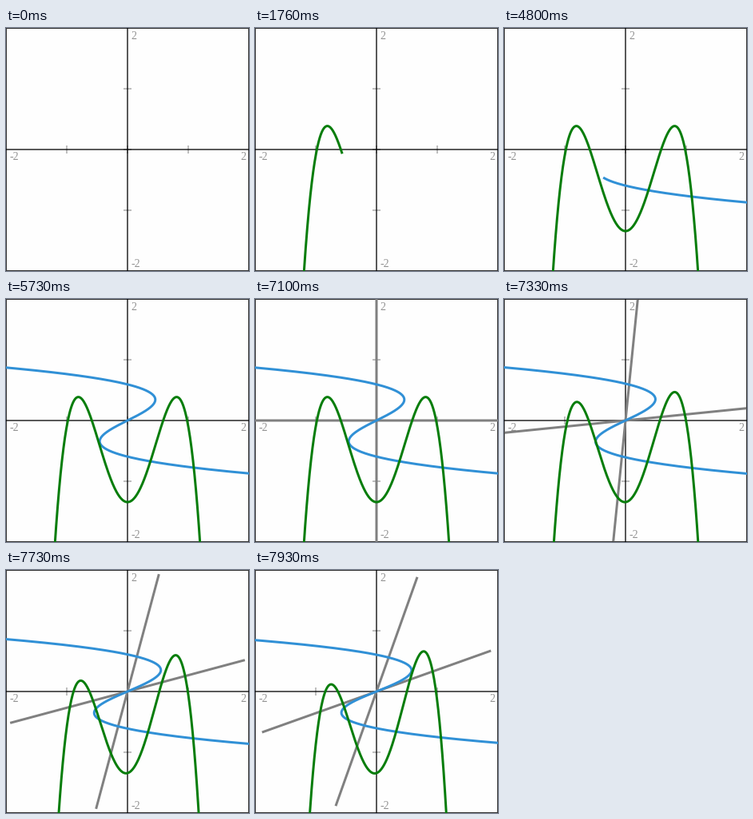
Animation, 304 px wide and 304 px high, one loop 8000 ms. Source, as a matplotlib script:

```python
import numpy as np
import matplotlib.pyplot as plt
from matplotlib.animation import FuncAnimation

SIZE = 304          # stage in pixels
UNIT = 76           # pixels per graph unit, also the dpi
PX = 72 / UNIT      # one pixel in points
MID = SIZE / 2
LOOP, STEP = 8000, 20
STEPS = 39          # steps in each drawing or turning move
GREEN_START, BLUE_START, TURN_START = 21, 81, 142
GREEN, BLUE, GRAY = "#067d0a", "#3090d6", "#808080"

fig = plt.figure(figsize=(SIZE / UNIT, SIZE / UNIT), dpi=UNIT, facecolor="#fefefe")
ax = fig.add_axes([0, 0, 1, 1])
ax.set_xlim(0, SIZE)
ax.set_ylim(SIZE, 0)
ax.axis("off")


def line(xs, ys, color, width, z):
    return ax.plot(xs, ys, color=color, lw=width * PX, zorder=z, snap=False,
                   solid_capstyle="butt", solid_joinstyle="round")[0]


def label(x, y, text, align):
    ax.text(x, y, text, family="Liberation Serif", size=14 * PX, color="#929292",
            ha=align, va="baseline", zorder=2)


def place(artist, x, y):
    artist.set_data(MID + UNIT * x, MID - UNIT * y)


def quartic(x):
    return -4.04 * x**4 + 5.287 * x**2 - 1.343


def cubic(y):
    return 2.0 * y - 5.66 * y**3


# Frame, axes, ticks and labels; lines lie on pixel edges and blend over two pixels
line([0, SIZE, SIZE, 0, 0], [0, 0, SIZE, SIZE, 0], "#333333", 2, 1)
line([0, SIZE], [MID, MID], "black", 1.3, 1)
line([MID, MID], [0, SIZE], "black", 1.3, 1)
for pos in (76, 152, 228):
    line([pos, pos], [147, 157], GRAY, 1, 0.5)
    line([147, 157], [pos, pos], GRAY, 1, 0.5)
label(156.5, 14, "2", "left")
label(156.5, 299, "-2", "left")
label(4.5, 165, "-2", "left")
label(300, 165, "2", "right")

flat_axis = line([], [], GRAY, 3, 3)
steep_axis = line([], [], GRAY, 3, 3)
blue = line([], [], BLUE, 3, 4)
green = line([], [], GREEN, 3, 5)
moving = [flat_axis, steep_axis, blue, green]


def tick(t):
    """Step count for uneven 30/70 ms pacing, with one phase slip."""
    if 2230 <= t < 3130:
        return 2 * ((t - 30) // 100) + ((t - 30) % 100 >= 30) + 1
    return 2 * (t // 100) + (t % 100 >= 30)


def span(n):
    """Parameter values drawn after n steps of a sweep from -2 to 2."""
    if n <= 0:
        return np.array([])
    return np.linspace(-2, -2 + 4 * min(n, STEPS) / STEPS, 500)


def update(i):
    n = tick(i * STEP + STEP // 2)
    angle = np.radians(45 * max(n - TURN_START, 0) / STEPS)
    c, s = np.cos(angle), np.sin(angle)

    u = span(n - GREEN_START)
    place(green, u * c, quartic(u) + u * s)
    v = span(n - BLUE_START)
    place(blue, cubic(v) + v * s, v * c)

    ends = np.array([-2, 2]) if n >= TURN_START else np.array([])
    place(flat_axis, ends * c, ends * s)
    place(steep_axis, ends * s, ends * c)
    return moving


anim = FuncAnimation(fig, update, frames=LOOP // STEP, interval=STEP,
                     repeat=True, repeat_delay=0, blit=False)
plt.show()
```
